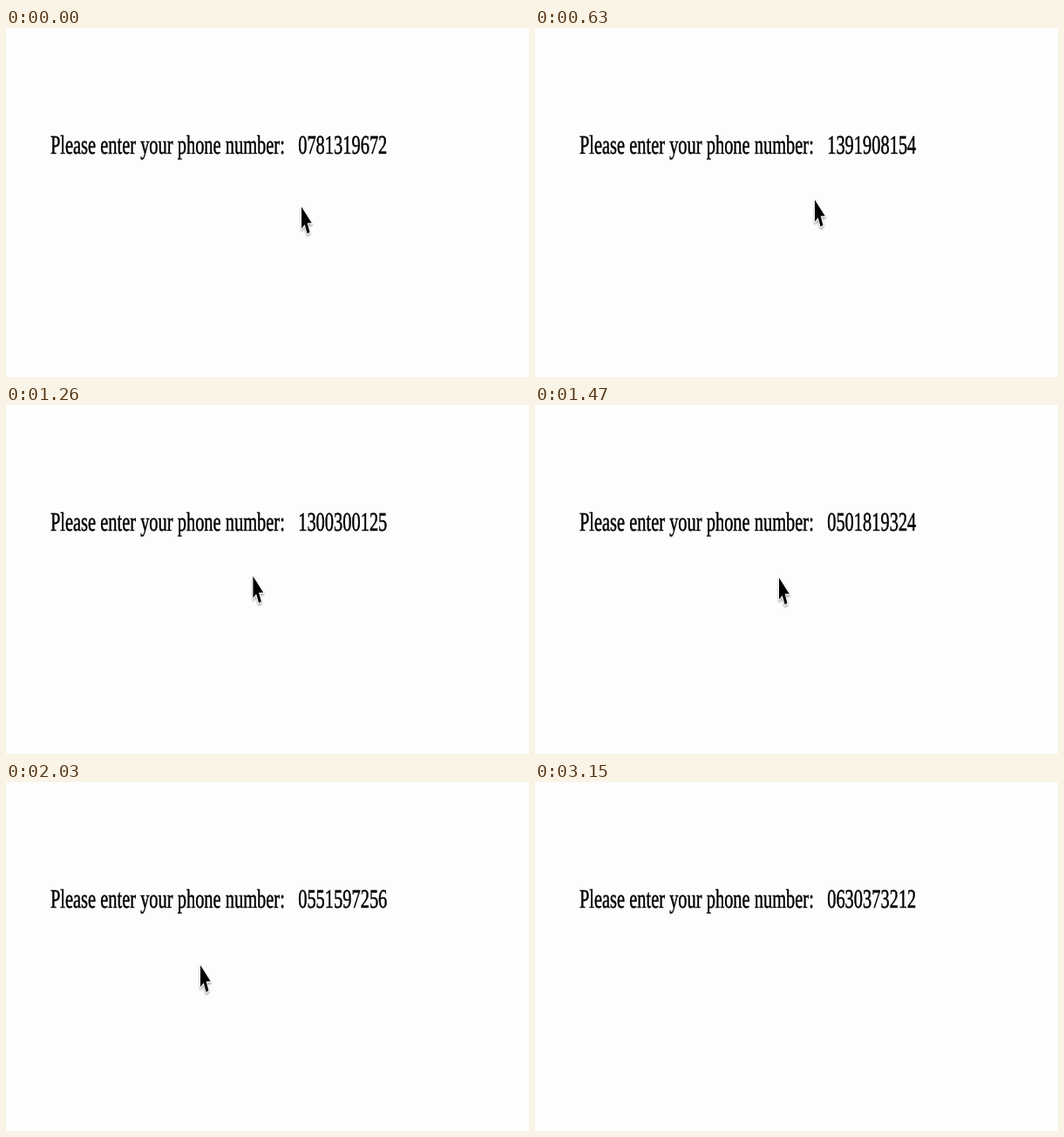
An HTML page that plays this animation: 600x400 px, repeating every 3220 ms.

```html
<!DOCTYPE html>
<html lang="en">
<head>
<meta charset="utf-8">
<title>Phone number</title>
<style>
html, body { margin: 0; width: 100%; height: 100%; overflow: hidden; background: #fdfdfd; }
svg { display: block; width: 600px; height: 400px; }
text {
  font: 16px "Liberation Serif", "Times New Roman", serif;
  white-space: pre; text-rendering: geometricPrecision;
  stroke: #000; stroke-width: .28px; filter: blur(.2px);
}
#cursor { filter: drop-shadow(0 2px 1px rgba(0, 0, 0, .35)); }
</style>
</head>
<body>
<svg viewBox="0 0 600 400">
  <!-- the whole page is shown taller than wide -->
  <g transform="translate(50.9 143.7) scale(1.277 1.9)">
    <text id="line"></text>
  </g>
  <g id="cursor">
    <path transform="scale(1.277 1.9)" d="M0 0V13.2L2.9 10.6 5.2 16.2 7.4 15.2 5.2 9.8H9.2Z"
      stroke="#fff" stroke-width="1.4" stroke-linejoin="round" paint-order="stroke"/>
  </g>
</svg>
<script>
const STEP = 70, STEPS = 46;
const line = document.getElementById("line");
const cursor = document.getElementById("cursor");

// step, x, y of the pointer tip
const path = [
  [1, 339, 205], [9, 321, 197], [14, 288, 194], [21, 280, 198],
  [29, 223, 210], [31, 205, 211], [32, 205, 211], [36, 75, 242]
];

// Steps in which nothing moves repeat the one before.
function settle(step) {
  if (step === 1) return 0;
  if (step === 32) return 31;
  return step > 37 && step < 42 ? 37 : step;
}

function random(seed) {
  const v = Math.sin(seed * 12.9898 + 4.1) * 43758.5453;
  return v - Math.floor(v);
}

// Groups begin with 0 or 1, so no number can be dialled.
function phone(step) {
  let digits = "";
  for (let i = 0; i < 10; i++) {
    digits += Math.floor(random(step * 10 + i + 1) * (i === 0 || i === 3 ? 2 : 10));
  }
  return digits;
}

function position(step) {
  if (step <= path[0][0]) return path[0].slice(1);
  const i = path.findIndex(p => p[0] >= step);
  const [s0, x0, y0] = path[i - 1], [s1, x1, y1] = path[i];
  const t = (step - s0) / (s1 - s0);
  return [x0 + (x1 - x0) * t, y0 + (y1 - y0) * t];
}

function draw(now) {
  const step = settle(Math.floor(now / STEP) % STEPS);
  line.textContent = "Please enter your phone number:   " + phone(step);
  const visible = step <= 36;
  cursor.setAttribute("visibility", visible ? "visible" : "hidden");
  if (visible) cursor.setAttribute("transform", `translate(${position(step)})`);
}

const start = performance.now();
function frame() {
  draw(performance.now() - start);
  requestAnimationFrame(frame);
}
frame();
</script>
</body>
</html>
```
